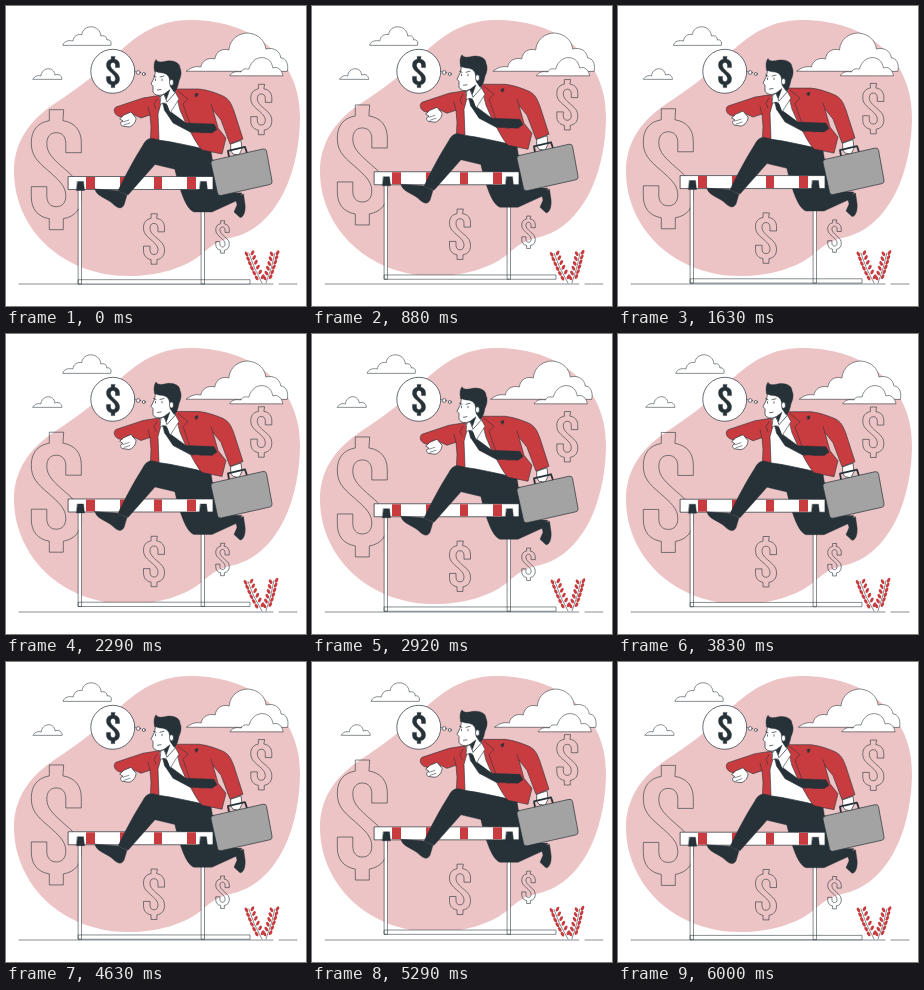
These frames come from a looping animation (300 by 300 pixels, 6.04 s). An HTML page:

```html
<!DOCTYPE html>
<html lang="en">
<head>
<meta charset="utf-8">
<title>Hurdle</title>
<style>
  html, body { margin: 0; width: 100%; height: 100%; overflow: hidden; background: #fff; }
  svg { display: block; width: 100%; height: 100%; stroke-linejoin: round; stroke-linecap: round; }
  .line { fill: #fff; stroke: #263238; stroke-width: .7; }
  .none { fill: none; stroke: #263238; stroke-width: .7; }
  .thin { stroke-width: .55; }
  .bold { stroke-width: 1.8; }
  .dark { fill: #263238; stroke: #263238; stroke-width: .4; }
  .red { fill: #c83c40; stroke: #263238; stroke-width: .6; }
  .grey { fill: #a3a3a3; stroke: #263238; stroke-width: .7; }
  .coin { fill: none; stroke: #263238; stroke-width: .6; }
  #sign { vector-effect: non-scaling-stroke; }
</style>
</head>
<body>
<svg viewBox="0 0 300 300">
  <defs>
    <path id="sign" d="M7-49C19-47 25-39 25-27V-17H9.500V-26C9.500-33 6-37 0-37C-6-37-9.500-33-9.500-26C-9.500-16-2-10 8-1C20 9 25 15 25 27C25 39 19 47 7 49V60H-7V49C-19 47-25 39-25 27V17H-9.500V26C-9.500 33-6 37 0 37C6 37 9.500 33 9.500 26C9.500 16 2 10-8 1C-20-9-25-15-25-27C-25-39-19-47-7-49V-60H7Z"/>
  </defs>

  <path fill="#edc4c5" d="M8 165C8 136 24 114 48 98C72 82 90 69 106 53C126 33 148 14 184 14C252 14 294 56 294 110C294 168 270 222 226 231.500C212 235 206 239 197 247C180 262 152 270 122 270C58 270 8 224 8 165Z"/>

  <g id="clouds" class="line thin">
    <path d="M57 39C58 35 63 34 67 35C68 30 71 28 76 28.500C77 18 94 18 95 30C99 29 101 31 101 34C104 33 106 36 105 39Z"/>
    <path d="M27 73C29 70 32 69 35 70C36 61 48 60 49 69C54 67 56 71 56 73Z"/>
    <path d="M180.500 65C186 61 190 60 195 61C196 55 202 51 209 53C210 45 217 42 223 44C224 32 234 27 242 27C253 28 259 35 260 43C268 41 274 45 275 52C280 52 283 58 281.500 65Z"/>
    <path d="M224 69.500C226 66 230 65 235 66C237 62 240 63 243 63C245 55 252 50 259 52C265 54 266 58 267 62C272 60 276 64 277 69.500Z"/>
  </g>

  <path class="none thin" d="M13 278H267M273 278H291"/>
  <g id="plants"></g>

  <g id="float">
    <g id="signs" class="coin"></g>

    <!-- hurdle frame -->
    <path class="line thin" d="M72.500 273.700H244V278H72.500ZM72.500 180H75.500V278H72.500ZM195.500 180H198.500V278H195.500Z"/>

    <!-- trailing leg -->
    <path class="dark" d="M169 154L203 143L209 166L214 186L236 187L230 195L206 206L188 206C180 203 174 185 169 164Z"/>
    <path class="dark" d="M229 191L237.500 188L239 198C240 206 237 212 234 211.500L228 206L231 199Z"/>

    <!-- hurdle bar -->
    <path class="line" d="M62.500 170.500H207V183.500H62.500Z"/>
    <path fill="#c83c40" d="M80 171H89V183H80ZM114 171H122V183H114ZM148 171H156V183H148ZM181 171H190V183H181Z"/>
    <path class="dark" d="M71.500 175.500H77.500L78.500 184.500H70.500ZM194.500 175.500H200.500L201.500 184.500H193.500Z"/>

    <!-- leading leg -->
    <path class="dark" d="M147 132C166 133 188 140 205 145L209 170H176L170 163.500L149 158.500L122 189L112 185C119 170 128 153 137 139C139 135 142 132 147 132Z"/>
    <path class="dark" d="M89 183L111 184.500L121 189L118 199C115 204 111 202 106 197C100 192 90 190 89 183Z"/>

    <!-- torso -->
    <path class="line" d="M153 91L168 86L182 112L198 143C184 140 168 136 152 134L149 110Z"/>
    <path class="red" d="M153 89.500L137 92L110 101C107 103 108 108 112 110L118 112L124 107L135 112L144 109L145 121L144.500 132L153 134L152 108L155 97Z"/>
    <path class="red" d="M169 83L193 83C202 84 210 87 217 90C223 93 225 97 228 105L237 133L224 138L215 114L207 104L212 122L220 132L216 148L196 144C191 139 187 130 181 120L174 104Z"/>
    <path class="none thin" d="M207 104L205 98M172 85L182 93L177 98L187 127M195 127L206 125M151 93L148 98L150 103M144 109L142 101"/>
    <path class="dark" d="M189 88L192 87L191.500 90L190 91Z"/>

    <!-- tie and collar -->
    <path class="dark" d="M157 97L162 99L165 106L180 117L208 118L211 123.500L206 127L184 126L167 117L159 105Z"/>
    <path class="line thin" d="M155 90L154 98L160 97L164 107L173 93L168 84Z"/>
    <path class="dark" d="M157 97L161 99L164 107L159 105Z"/>

    <!-- head -->
    <path class="line" d="M149.500 65L148.500 71L145 78L147 80V86C149 90 154 90 158 88L161 96L169 87L168 72L160 64Z"/>
    <path class="dark" d="M158 88L164 83.500L160.500 93Z"/>
    <path class="dark" d="M148.500 65C147.500 60 148 56 150 53.500C152 57 156 56 161 55C168 54 174 57 174 62C176 66 175 71 173 75C172 80 171 84 168 86L164 80L163.500 74C163 70 161 68 157 67C154 67 151 66 148.500 65Z"/>
    <ellipse class="line thin" cx="165.500" cy="76.500" rx="2" ry="3"/>
    <path class="none" d="M147.500 70L150 71M154 71L158 70M149.500 73V74.500M156 73V74.500M151.500 84L155 83.500"/>

    <!-- hands and case -->
    <path class="line" d="M118 109L125 106L130 112C130 116 127 120 123 121L116 120C114 118 114 116 117 115L114 113Z"/>
    <path class="none thin" d="M117 116L123 114M118 119L124 117"/>
    <path class="line" d="M225 138L235 134.500L236 143L233 149L227 148L225 145Z"/>
    <path class="none bold" d="M223 151L222 145L239 141L241 147"/>
    <path class="grey" d="M207 154.300L257 143Q260 142.500 260.500 145L266 175Q266.500 178 264 178.500L215 189.500Q212 190 211.500 187L205 157.500Q204.500 155 207 154.300Z"/>
  </g>

  <circle class="line" cx="106.800" cy="65.300" r="22"/>
  <circle class="line" cx="132.300" cy="66.500" r="1.900"/>
  <circle class="line" cx="137.800" cy="68" r="1.500"/>
  <use href="#sign" class="dark" transform="translate(107 66) scale(.26)"/>
</svg>
<script>
  const LOOP = 6040, BOB = LOOP / 4;
  const get = id => document.getElementById(id);

  get('signs').innerHTML = [[50.3, 163.7, 1], [148, 233, .42], [255.3, 103.5, .42], [216.5, 231, .27]]
    .map(([x, y, s]) => `<use href="#sign" transform="translate(${x} ${y}) scale(${s})"/>`).join('');

  // A stem curves outward from its foot to its tip, with paired leaves along it.
  function plant(foot, tip) {
    const bend = (foot + tip * 2) / 3;
    let out = `<path class="none thin" d="M${foot} 277Q${bend} 262 ${tip} 247"/>`;
    for (let i = 0; i < 6; i++) {
      const u = .14 + i * .16;
      const x = foot * (1 - u) ** 2 + 2 * bend * u * (1 - u) + tip * u * u;
      const y = 277 - 30 * u;
      for (const d of [-1, 1])
        out += `<ellipse rx="1.5" ry="2.6" fill="#c83c40" transform="translate(${x + d * 3} ${y - 1.5 - d * .6}) rotate(${d * 30})"/>`;
    }
    return out;
  }
  get('plants').innerHTML = plant(256, 243) + plant(260, 269);

  function draw(now) {
    const t = now % LOOP;
    const rise = 1 - Math.abs(1 - 2 * (t % BOB) / BOB);
    const drift = 1.2 * Math.cos(2 * Math.PI * (t - 5350) / LOOP) + 2.1 * rise - 1;
    get('float').setAttribute('transform', `translate(0 ${-5.7 * rise})`);
    get('clouds').setAttribute('transform', `translate(${drift} 0)`);
    get('plants').setAttribute('transform', `rotate(${-2 * rise} 258 278)`);
    requestAnimationFrame(draw);
  }
  requestAnimationFrame(draw);
</script>
</body>
</html>
```
